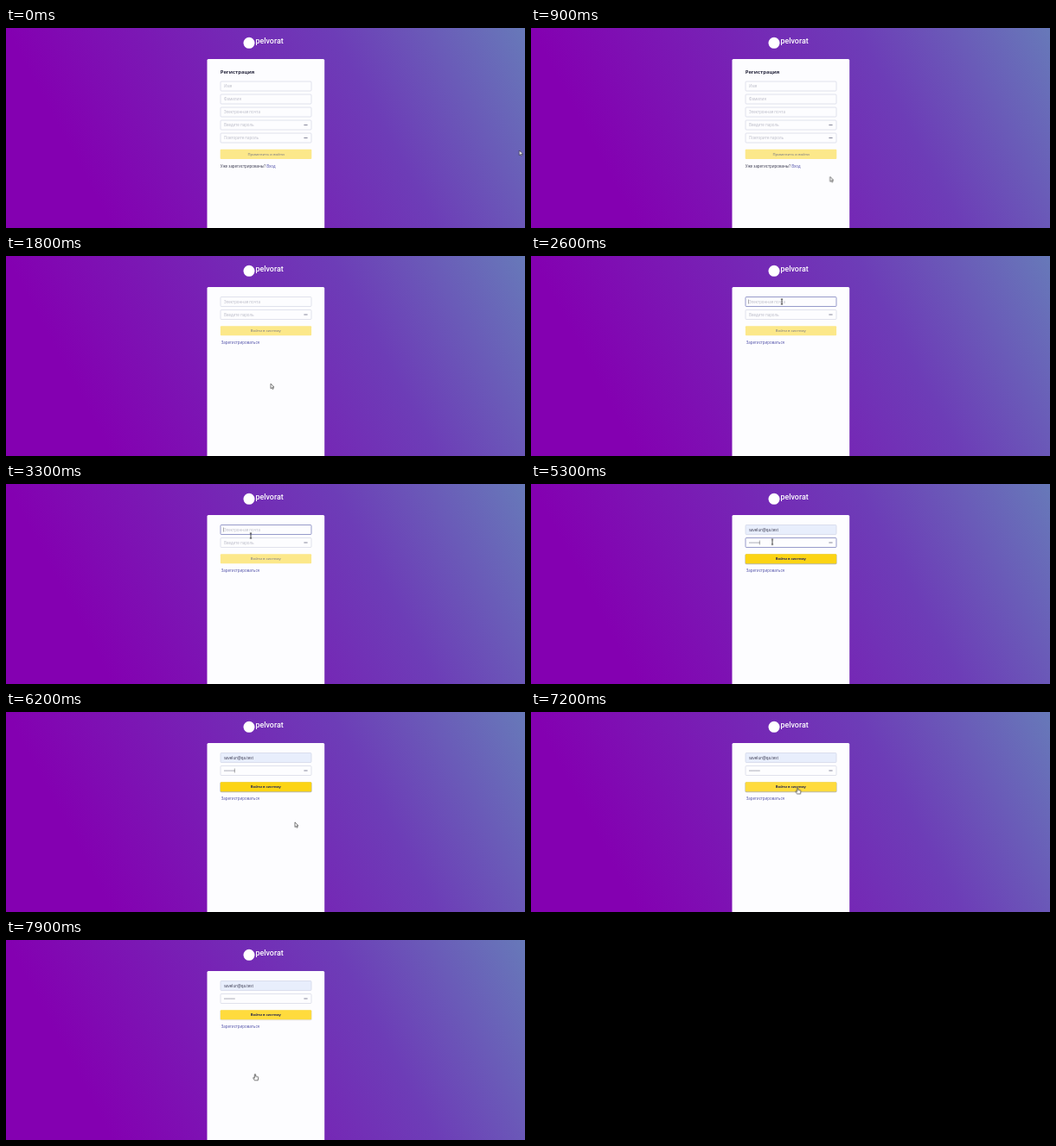
Write an HTML page that moves like this. It is 600 px wide and 232 px high and loops after 8000 ms.

```html
<!DOCTYPE html>
<html lang="ru">
<head>
<meta charset="utf-8">
<title>Регистрация и вход</title>
<style>
html, body { margin: 0; width: 100%; height: 100%; overflow: hidden; }
body { background: linear-gradient(62deg, #8400b1 0%, #8400b1 17%, #7b18b4 38%, #6d3db7 69%, #6779b9 100%); }
svg { display: block; width: 600px; height: 232px; }
text { font: 4.45px "Open Sans", "Noto Sans", sans-serif; fill: #33334a; }
.brand { font: 500 8.9px Roboto, Inter, sans-serif; fill: #fff; }
.title { font-size: 5.9px; font-weight: 700; fill: #2a2a40; }
.hint { fill: #b9bac6; }
.link { fill: #4c4ca6; }
.label { font-size: 4.2px; font-weight: 600; text-anchor: middle; fill: #8f8c86; }
.field { fill: #fdfdff; stroke: #d9dbe8; stroke-width: .8; }
.button { fill: #fce88a; }
.caret { stroke: #333; stroke-width: .5; }
.eye { stroke: #85869a; stroke-width: 1; stroke-linecap: round; }

/* Percentages are ms / 80; the small lead keeps step edges on time. */
.k { animation: 8s step-end -10ms infinite both; }
#signup { animation-name: signup; }
#signin { animation-name: signin; }
#mailHint { animation-name: mailHint; }
#mailBox { animation-name: mailBox; }
#mailCaret { animation-name: mailCaret; }
#mail, #enterLabel { animation-name: filled; }
#passBox { animation-name: passBox; }
#passHint { animation-name: passHint; }
#passCaret { animation-name: passCaret; }
#dots { animation-name: dots; }
#enter { animation-name: enter; }
#shadow { animation-name: shadow; }
#pointer { animation-name: travel; }
#arrow { animation-name: arrow; }
#hand { animation-name: hand; }
#beam { animation-name: beam; }

@keyframes signup { 0% { opacity: 1 } 22.5%, to { opacity: 0 } }
@keyframes signin { 0% { opacity: 0 } 22.5%, to { opacity: 1 } }
@keyframes mailHint { 0% { opacity: 1 } 45%, to { opacity: 0 } }
@keyframes mailBox {
  0% { fill: #fdfdff; stroke: #d9dbe8 }
  31.25% { fill: #fdfdff; stroke: #7d82bd }
  45%, to { fill: #e8eefc; stroke: #d3d9ea }
}
@keyframes mailCaret { 0% { opacity: 0 } 31.25% { opacity: 1 } 45%, to { opacity: 0 } }
@keyframes filled { 0% { opacity: 0 } 45%, to { opacity: 1 } }
@keyframes passBox { 0% { stroke: #d9dbe8 } 48.75% { stroke: #7d82bd } 75%, to { stroke: #d9dbe8 } }
@keyframes passHint { 0% { opacity: 1 } 52.5%, to { opacity: 0 } }
@keyframes passCaret {
  0% { opacity: 0; transform: none }
  48.75% { opacity: 1; transform: none }
  52.5% { opacity: 1; transform: translateX(1.6px); animation-timing-function: steps(1) }
  57.5% { opacity: 1; transform: translateX(1.6px); animation-timing-function: steps(7) }
  66.25% { opacity: 1; transform: translateX(12.8px) }
  78.75%, to { opacity: 0; transform: translateX(12.8px) }
}
@keyframes dots {
  0% { width: 0 }
  52.5% { width: 1.6px }
  57.5% { width: 1.6px; animation-timing-function: steps(7) }
  66.25%, to { width: 12.8px }
}
@keyframes enter { 0% { fill: #fce88a } 45% { fill: #fcd414 } 88.75%, to { fill: #ffdb3d } }
@keyframes shadow { 0% { opacity: 0 } 45% { opacity: .5 } 91.25%, to { opacity: .2 } }
@keyframes travel {
  0% { transform: translate(593.5px, 142px); animation-timing-function: steps(7) }
  8.75% { transform: translate(372px, 182px); animation-timing-function: steps(2) }
  11.25% { transform: translate(345.7px, 172.5px); animation-timing-function: steps(7) }
  20% { transform: translate(308px, 160px) }
  21.25% { transform: translate(308px, 160px); animation-timing-function: steps(9) }
  32.5% { transform: translate(290px, 53px); animation-timing-function: steps(9) }
  43.75% { transform: translate(281px, 62px); animation-timing-function: steps(4) }
  48.75% { transform: translate(279px, 67.2px) }
  68.75% { transform: translate(279px, 67.2px); animation-timing-function: steps(5) }
  75% { transform: translate(333px, 127.5px) }
  77.5% { transform: translate(334px, 127.8px) }
  78.75% { transform: translate(334px, 127.8px); animation-timing-function: steps(9) }
  90% { transform: translate(308.2px, 87.5px) }
  92.5% { transform: translate(308.2px, 87.5px); animation-timing-function: steps(5) }
  98.75%, to { transform: translate(288px, 155.3px) }
}
@keyframes arrow {
  0% { opacity: 1 } 20% { opacity: 0 } 22.5% { opacity: 1 }
  31.25% { opacity: 0 } 71.25% { opacity: 1 } 88.75%, to { opacity: 0 }
}
@keyframes hand { 0% { opacity: 0 } 20% { opacity: 1 } 22.5% { opacity: 0 } 88.75%, to { opacity: 1 } }
@keyframes beam { 0% { opacity: 0 } 31.25% { opacity: 1 } 71.25%, to { opacity: 0 } }
</style>
</head>
<body>
<svg viewBox="0 0 600 232">
  <defs>
    <rect id="box" x="248" width="105" height="11" rx="1"/>
    <path id="eye" d="M344.8 0h3.4"/>
    <pattern id="dot" x="252" y="66" width="1.6" height="4" patternUnits="userSpaceOnUse">
      <circle cx=".8" cy="2" r=".5" fill="#55566a"/>
    </pattern>
  </defs>

  <circle cx="281" cy="17.3" r="6.5" fill="#fff"/>
  <text class="brand" x="288.5" y="18.4">pelvorat</text>
  <path d="M232.5 232V37.5a1.5 1.5 0 0 1 1.5-1.5H366.700a1.500 1.500 0 0 1 1.500 1.500V232z" fill="#fdfdff"/>

  <g id="signup" class="k">
    <text class="title" x="247.700" y="53.300">Регистрация</text>
    <g class="field">
      <use href="#box" y="62"/>
      <use href="#box" y="77"/>
      <use href="#box" y="92"/>
      <use href="#box" y="107"/>
      <use href="#box" y="122"/>
    </g>
    <text class="hint" x="252" y="69.200">Имя</text>
    <text class="hint" x="252" y="84.200">Фамилия</text>
    <text class="hint" x="252" y="99.200">Электронная почта</text>
    <text class="hint" x="252" y="114.200">Введите пароль</text>
    <text class="hint" x="252" y="129.200">Повторите пароль</text>
    <use class="eye" href="#eye" y="112.500"/>
    <use class="eye" href="#eye" y="127.500"/>
    <rect class="button" x="247.700" y="140.700" width="105.600" height="11.300" rx="1"/>
    <text class="label" x="300.700" y="147.900">Применить и войти</text>
    <text x="247.700" y="162.200">Уже зарегистрированы? <tspan class="link">Вход</tspan></text>
  </g>

  <g id="signin" class="k">
    <use id="mailBox" class="field k" href="#box" y="47.500"/>
    <text id="mailHint" class="hint k" x="252" y="54.600">Электронная почта</text>
    <text id="mail" class="k" x="252" y="54.600">savelun@qa.test</text>
    <path id="mailCaret" class="caret k" d="M251.700 50.500v5"/>
    <use id="passBox" class="field k" href="#box" y="62.500"/>
    <text id="passHint" class="hint k" x="252" y="69.700">Введите пароль</text>
    <rect id="dots" class="k" x="252" y="66" width="0" height="4" fill="url(#dot)"/>
    <path id="passCaret" class="caret k" d="M251.700 65.500v5"/>
    <use class="eye" href="#eye" y="68"/>
    <rect id="shadow" class="k" x="247.400" y="81.600" width="106.200" height="11.600" rx="1.400" fill="#77765f"/>
    <rect id="enter" class="button k" x="247.900" y="81.300" width="105.200" height="11" rx="1"/>
    <text class="label" x="300.300" y="88.300">Войти в систему</text>
    <text id="enterLabel" class="label k" x="300.300" y="88.300" style="fill:#2d2630">Войти в систему</text>
    <text class="link" x="248.700" y="101.800">Зарегистрироваться</text>
  </g>

  <g id="pointer" class="k" stroke-linejoin="round">
    <path id="arrow" class="k" d="M0 0V5.700L1.300 4.500 2.200 6.400 3.200 5.900 2.300 4.100H4z" fill="#fff" stroke="#222" stroke-width=".6"/>
    <path id="hand" class="k" d="M-.7.700Q0-.3.700.700V3L3 3.400Q3.900 3.600 3.800 4.500L3.200 7.600H-.5L-2.400 4.900Q-2.300 4-1.400 4.400L-.7 5z" fill="#fff" stroke="#222" stroke-width=".65"/>
    <path id="beam" class="k" d="M-1.200-3H1.200M0-3V3M-1.200 3H1.200" fill="none" stroke="#222" stroke-width=".8"/>
  </g>
</svg>
</body>
</html>
```
